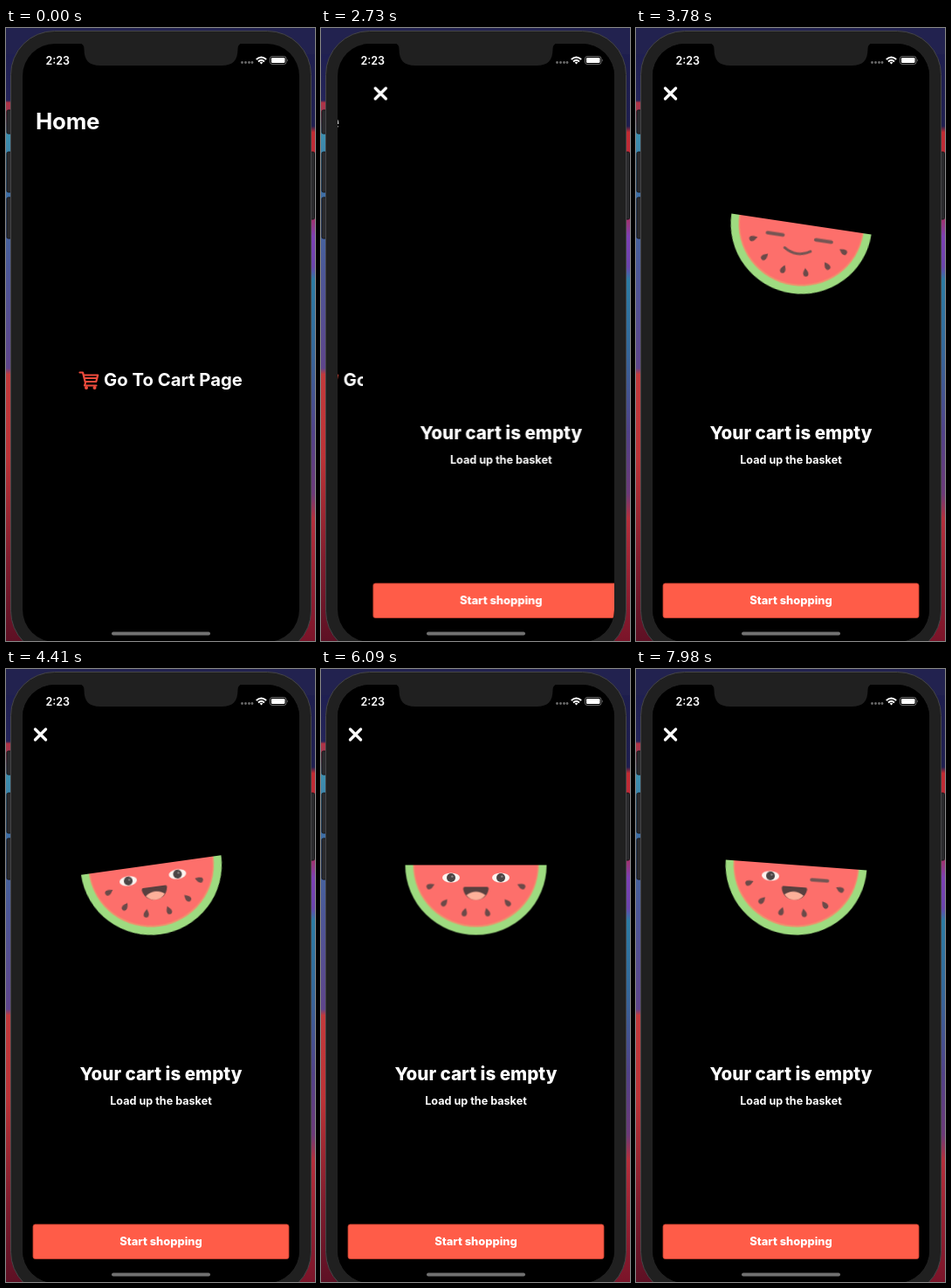
An HTML page that plays this animation: 354 by 702 pixels, repeating every 8 s.

```html
<!DOCTYPE html>
<html lang="en">
<head>
<meta charset="utf-8">
<title>Empty cart</title>
<style>
html, body { margin: 0; width: 100%; height: 100%; overflow: hidden; background: #181a43; }
svg { display: block; width: 354px; height: 702px; }
text { font-family: Inter, Roboto, sans-serif; font-weight: 700; fill: #fff; }
.mid { text-anchor: middle; }
.bold { font-weight: 800; }

.home, .cart, .pop, .roll, .eye, .lid, .smile, .mouth {
  animation: 8s linear infinite;
}

/* page push, 2400 to 3100 ms */
.home { animation-name: leave; }
.cart { animation-name: enter; }
@keyframes leave {
  0%, 30% { transform: none; animation-timing-function: cubic-bezier(.22, .72, .25, 1); }
  38.75%, 100% { transform: translateX(-95px); }
}
@keyframes enter {
  0%, 30% { transform: translateX(317px); animation-timing-function: cubic-bezier(.22, .72, .25, 1); }
  38.75%, 100% { transform: none; }
}

.pop { animation-name: pop; }
@keyframes pop {
  0%, 35.6% { transform: scale(0); animation-timing-function: ease-out; }
  40% { transform: scale(1.06); animation-timing-function: ease-in-out; }
  41.8%, 100% { transform: scale(1); }
}

/* rolling on the rind: 1.414px of travel per degree */
.roll { animation-name: roll; animation-timing-function: ease-in-out; }
@keyframes roll {
  0%, 41.25% { transform: translateX(0) rotate(0deg); }
  47.25% { transform: translateX(12px) rotate(8.5deg); }
  55.4% { transform: translateX(-11.3px) rotate(-8deg); }
  63.8% { transform: translateX(-.5px) rotate(-.35deg); }
  68.25%, 93.6% { transform: translateX(0) rotate(0deg); }
  100% { transform: translateX(6.1px) rotate(4.3deg); }
}

.eye { animation-name: open-left; }
.eye.right { animation-name: open-right; }
.lid { animation-name: shut-left; }
.lid.right { animation-name: shut-right; }
@keyframes open-left {
  0%, 52% { transform: scaleY(0); }
  53.5%, 81% { transform: scaleY(1); }
  82%, 84.5% { transform: scaleY(0); }
  85.5%, 100% { transform: scaleY(1); }
}
@keyframes open-right {
  0%, 52% { transform: scaleY(0); }
  53.5%, 81% { transform: scaleY(1); }
  82%, 84.5% { transform: scaleY(0); }
  85.5%, 97% { transform: scaleY(1); }
  98%, 100% { transform: scaleY(0); }
}
@keyframes shut-left {
  0%, 52% { opacity: 1; }
  52.6%, 81.5% { opacity: 0; }
  82%, 84.5% { opacity: 1; }
  85%, 100% { opacity: 0; }
}
@keyframes shut-right {
  0%, 52% { opacity: 1; }
  52.6%, 81.5% { opacity: 0; }
  82%, 84.5% { opacity: 1; }
  85%, 97.5% { opacity: 0; }
  98%, 100% { opacity: 1; }
}

.smile { animation-name: smile; }
.mouth { animation-name: speak; }
@keyframes smile {
  0%, 52% { opacity: 1; }
  52.5%, 100% { opacity: 0; }
}
@keyframes speak {
  0%, 52% { transform: scaleY(0); }
  54%, 100% { transform: scaleY(1); }
}
</style>
</head>
<body>
<svg viewBox="0 0 354 702">
  <defs>
    <linearGradient id="left" x2="0" y2="1">
      <stop offset="0" stop-color="#1d1d4d"/>
      <stop offset=".118" stop-color="#24245a"/>
      <stop offset=".122" stop-color="#b03344"/>
      <stop offset=".14" stop-color="#9a3a58"/>
      <stop offset=".175" stop-color="#3d8fae"/>
      <stop offset=".27" stop-color="#3f6fa5"/>
      <stop offset=".4" stop-color="#4d5797"/>
      <stop offset=".555" stop-color="#5f458c"/>
      <stop offset=".565" stop-color="#c23a3c"/>
      <stop offset=".7" stop-color="#bb3337"/>
      <stop offset=".87" stop-color="#801d2e"/>
      <stop offset="1" stop-color="#5d1024"/>
    </linearGradient>
    <linearGradient id="right" x2="0" y2="1">
      <stop offset="0" stop-color="#1d1d4d"/>
      <stop offset=".16" stop-color="#1f1f50"/>
      <stop offset=".17" stop-color="#c12b32"/>
      <stop offset=".3" stop-color="#b02d4c"/>
      <stop offset=".34" stop-color="#7d40b4"/>
      <stop offset=".39" stop-color="#6a45ad"/>
      <stop offset=".41" stop-color="#2c7ba3"/>
      <stop offset=".52" stop-color="#34699a"/>
      <stop offset=".66" stop-color="#514288"/>
      <stop offset=".76" stop-color="#6c3a78"/>
      <stop offset=".8" stop-color="#b42f3c"/>
      <stop offset="1" stop-color="#7a1429"/>
    </linearGradient>
    <clipPath id="screen"><rect x="19" y="18" width="317" height="685" rx="37"/></clipPath>
    <path id="seed" d="M0-5C2-2 3.2 0 3 1.8A3 3 0 0 1-3 1.8C-3.2 0-2-2 0-5Z" fill="#6b4a49"/>
    <g id="open">
      <ellipse rx="10" ry="5.5" fill="#fbf4f0"/>
      <circle r="5" fill="#4b4545"/>
      <circle cx="1.3" cy="-1.4" r="1.2" fill="#8d8787"/>
    </g>
  </defs>

  <rect width="177" height="702" fill="url(#left)"/>
  <rect x="177" width="177" height="702" fill="url(#right)"/>
  <rect width="354" height="30" fill="#22224f"/>

  <g fill="#2b2b2e" stroke="#151517">
    <rect x="1" y="94" width="8" height="27" rx="1.5"/>
    <rect x="1" y="142" width="8" height="46" rx="1.5"/>
    <rect x="1" y="194" width="8" height="47" rx="1.5"/>
    <rect x="345" y="142" width="8.5" height="77" rx="1.5"/>
  </g>
  <rect x="5.5" y="3.5" width="344" height="714" rx="50" fill="#202020" stroke="#454547"/>

  <g clip-path="url(#screen)">
    <rect x="19" y="18" width="317" height="685"/>

    <g class="home">
      <text x="34" y="116" font-size="25.8" letter-spacing="-.2">Home</text>
      <g fill="none" stroke="#ee4b3c" stroke-width="2.2" stroke-linecap="round" stroke-linejoin="round">
        <path d="M84.5 394.5H88L91 406.5 90 409.5H103.5M88.8 397.5H105.2L103.3 405H91M90 401H104"/>
      </g>
      <g fill="#ee4b3c"><circle cx="92" cy="412" r="2"/><circle cx="101.500" cy="412" r="2"/></g>
      <text x="112" y="409.700" font-size="20.300">Go To Cart Page</text>
    </g>

    <g class="cart">
      <rect x="19" y="18" width="317" height="685"/>
      <path d="M33.500 69 45.500 81M45.500 69 33.500 81" stroke="#fff" stroke-width="3.400" stroke-linecap="round"/>

      <g transform="translate(177.500 224.500)">
        <g class="pop"><g class="roll">
          <path d="M-81 0H81A81 80 0 0 1-81 0Z" fill="#9edb80"/>
          <path d="M-72 0H72A72 71 0 0 1-72 0Z" fill="#ef8f6c"/>
          <path d="M-70.500 0H70.500A70.500 69 0 0 1-70.500 0Z" fill="#fd6f6b"/>
          <use href="#seed" transform="translate(-52 24) rotate(65)"/>
          <use href="#seed" transform="translate(-36 43) rotate(40)"/>
          <use href="#seed" transform="translate(-13 54) rotate(14)"/>
          <use href="#seed" transform="translate(13 54) rotate(-14)"/>
          <use href="#seed" transform="translate(36 43) rotate(-40)"/>
          <use href="#seed" transform="translate(52 24) rotate(-65)"/>

          <g stroke="#765553" stroke-width="4" stroke-linecap="round" fill="none">
            <path class="lid" d="M-37 15.500H-19"/>
            <path class="lid right" d="M19 15.500H37"/>
            <path class="smile" d="M-15 29.500Q0 39 15 29.500" stroke-width="3"/>
          </g>
          <g transform="translate(-28.500 14.500)"><g class="eye"><use href="#open"/></g></g>
          <g transform="translate(28.500 14.500)"><g class="eye right"><use href="#open"/></g></g>

          <g transform="translate(0 25)"><g class="mouth">
            <path d="M-12.500 0H12.500Q15 0 14.500 3C13 11 7 15 0 15S-13 11-14.500 3Q-15 0-12.500 0Z" fill="#59403f"/>
            <path d="M-11 9.500Q0 1.500 11 9.500Q6.500 15 0 15T-11 9.500Z" fill="#fdb09a"/>
          </g></g>
        </g></g>
      </g>

      <text class="mid bold" x="177.500" y="471" font-size="20.600">Your cart is empty</text>
      <text class="mid" x="177.500" y="498.500" font-size="12.600">Load up the basket</text>
      <rect x="31" y="636" width="293" height="39.500" rx="2.500" fill="#ff5c48" stroke="#c9402f" stroke-width=".8"/>
      <text class="mid bold" x="177.500" y="660.300" font-size="12.900">Start shopping</text>
    </g>

    <text x="45.500" y="41.500" font-size="12.500" style="font-weight:600">2:23</text>
    <g fill="#6a6a6a">
      <circle cx="270.500" cy="39.500" r="1.400"/><circle cx="274.500" cy="39.500" r="1.400"/>
      <circle cx="278.500" cy="39.500" r="1.400"/><circle cx="282" cy="39.500" r="1.400"/>
    </g>
    <g fill="none" stroke="#fff" stroke-width="2">
      <path d="M286.800 36Q292.500 31 298.200 36M289 38.400Q292.500 35.400 296 38.400"/>
      <path d="M290.700 39.500Q292.500 38.200 294.300 39.500L292.500 41.500Z" fill="#fff" stroke="none"/>
    </g>
    <rect x="302.500" y="32.500" width="18.500" height="9" rx="2.500" stroke="#777" stroke-width=".9"/>
    <rect x="304" y="34" width="15.500" height="6" rx="1.300" fill="#fff"/>
    <path d="M322 35.500Q323.500 37 322 38.500Z" fill="#888"/>
    <rect x="121" y="691.500" width="113" height="4" rx="2" fill="#717171"/>
  </g>

  <path d="M84 17.500Q89.500 18 89.500 24C89.500 37 95 43 108 43H247C260 43 265.500 37 265.500 24Q265.500 18 271 17.500Z" fill="#202020"/>
</svg>
</body>
</html>
```
